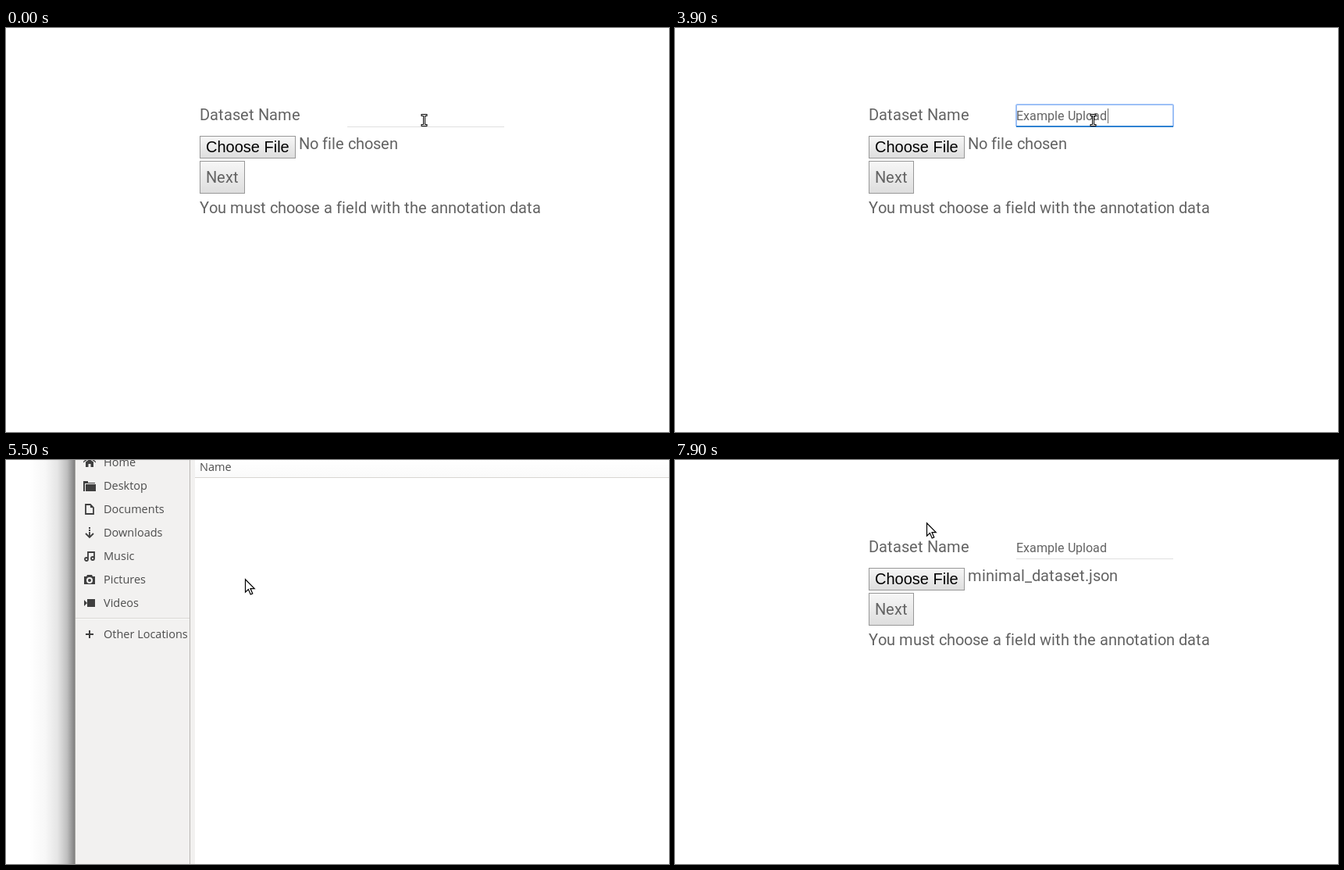
Animation, 849 px wide and 517 px high, one loop 8 s. Source, as an HTML page with a canvas:

```html
<!DOCTYPE html>
<html lang="en">
<head>
<meta charset="utf-8">
<title>Dataset upload</title>
<style>
html, body { margin: 0; width: 100%; height: 100%; overflow: hidden; background: #fff; }
canvas { display: block; }
</style>
</head>
<body>
<canvas id="stage" width="849" height="517"></canvas>
<script>
const ctx = document.getElementById('stage').getContext('2d');
const LOOP = 8000;
const INK = '#636363';
const ROBOTO = 'Roboto, sans-serif';
const UI = '14.5px "Open Sans", sans-serif';

const NAME = 'Example Upload';
const KEYS = [1300, 1600, 1700, 1800, 1900, 2100, 2300, 2400, 3000, 3400, 3500, 3700, 3700, 3900];
const SAVED = ['English Tales', 'erwe', 'sample', 'test', 'test data', 'new set'];

// label, centre y, filled path, stroked path (16 px icon box)
const PLACES = [
  ['Home', 3, 'M0 7 8 0l8 7v1.5L8 2.5 0 8.5zM3 7.5 8 4l5 3.5V14H9.5v-4h-3v4H3z', ''],
  ['Desktop', 33, 'M0 2h6v2h9v1H2v10H0zM3 6h13v9H3z', ''],
  ['Documents', 63, 'M9 2v4h4z', 'M3 2h6l4 4v8H3z'],
  ['Downloads', 93, 'M7 1h2v2H7zM7 4h2v2H7z', 'M3 9l5 5 5-5M8 7v6'],
  ['Music', 123, '', 'M6 12V3h8v8M6 12a2 2 0 1 1-4 0a2 2 0 1 1 4 0M14 11a2 2 0 1 1-4 0a2 2 0 1 1 4 0'],
  ['Pictures', 153, 'M1 4h3l1-2h6l1 2h3v10H1zM12 9a4 4 0 1 0-8 0a4 4 0 1 0 8 0M10 9a2 2 0 1 0-4 0a2 2 0 1 0 4 0', ''],
  ['Videos', 183, 'M1 4l4 4-4 4zM5 3h10v10H5z', ''],
  ['Other Locations', 223, 'M7 3h2v4h4v2H9v4H7V9H3V7h4z', '']
];

const ARROW = new Path2D('M.5 .8V17.2L4.4 13.6 7.2 20 9.8 18.9 7 12.6H12.2z');
const IBEAM = new Path2D('M-2.5 -6.5H2.5M0 -6.5V6.5M-2.5 6.5H2.5');

function rect(x, y, w, h, fill) {
  ctx.fillStyle = fill;
  ctx.fillRect(x, y, w, h);
}

function frame(x, y, w, h, color) {
  ctx.strokeStyle = color;
  ctx.lineWidth = 1;
  ctx.strokeRect(x + .5, y + .5, w - 1, h - 1);
}

function gradient(x0, y0, x1, y1, stops) {
  const g = ctx.createLinearGradient(x0, y0, x1, y1);
  stops.forEach(([at, color]) => g.addColorStop(at, color));
  return g;
}

function text(str, x, y, font, color) {
  ctx.font = font;
  ctx.fillStyle = color;
  ctx.fillText(str, x, y);
}

// Roboto with whole-pixel advances; returns the end x
function snapped(str, x, y, size, widths = {}) {
  for (const c of str) {
    text(c, x, y, size + 'px ' + ROBOTO, INK);
    x += widths[c] || Math.round(ctx.measureText(c).width);
  }
  return x;
}

function button(x, y, w, h, pressed) {
  const colors = pressed ? ['#dddddd', '#f6f6f6'] : ['#f7f7f7', '#dddddd'];
  rect(x, y, w, h, gradient(0, y, 0, y + h, [[0, colors[0]], [1, colors[1]]]));
  frame(x, y, w, h, '#989898');
}

function drawField(t) {
  const focused = t >= 200 && t < 5300;
  const typed = NAME.slice(0, KEYS.filter(k => k <= t).length);
  if (focused) {
    ctx.strokeStyle = '#9dc0f6';
    ctx.lineWidth = 2;
    ctx.beginPath();
    ctx.roundRect(437, 98, 201, 28, 1.5);
    ctx.stroke();
    rect(437, 125, 201, 2, '#2f82d2');
  } else {
    rect(437, 126, 201, 1, '#e0e0e0');
  }
  const end = snapped(typed, 437, 118, 16, { e: 9, d: 10 });
  const blinkedOff = t >= 800 && t < 1300;
  if (focused && !blinkedOff) rect(end, 103, 1, 19, '#666');
}

function drawMenu(t) {
  if (t < 300 || t >= 1600) return;
  const items = t < 1300 ? SAVED : SAVED.slice(0, 2);
  const h = items.length * 24 + 2;
  rect(436, 127, 204, h, '#fff');
  frame(436, 127, 204, h, '#000');
  items.forEach((s, i) => text(s, 445, 145 + i * 24, 'bold 14.4px "Open Sans", sans-serif', '#000'));
}

function drawForm(t) {
  snapped('Dataset Name', 248, 118, 20);
  button(248, 138, 123, 29, t >= 5300 && t < 5500);
  text('Choose File', 256, 159, '20px "Liberation Sans", Arial, sans-serif', '#000');
  snapped(t < 7300 ? 'No file chosen' : 'minimal_dataset.json', 375, 155, 20);
  button(248, 170, 58, 42, false);
  snapped('Next', 256, 198, 20);
  snapped('You must choose a field with the annotation data', 248, 237, 20);
  drawField(t);
  drawMenu(t);
}

function drawPlace([label, y, solid, line]) {
  text(label, 125, y + 5, UI, '#4c4c4c');
  ctx.save();
  ctx.translate(99, y - 8);
  ctx.fillStyle = ctx.strokeStyle = '#3f3f3f';
  ctx.lineWidth = 1.8;
  ctx.fill(new Path2D(solid), 'evenodd');
  ctx.stroke(new Path2D(line));
  ctx.restore();
}

function drawFileRow() {
  rect(242, 23, 607, 22, gradient(0, 23, 0, 45, [[0, '#eb6c3b'], [1, '#f27f50']]));
  rect(242, 23, 607, 1, '#e0642f');
  rect(251, 26, 12, 16, '#ecebe8');
  frame(251, 26, 12, 16, '#b5aca5');
  for (let i = 0; i < 5; i++) rect(253, 29 + i * 2, 5 + i * 2 % 3, 1, '#8d8a86');
  text('minimal_dataset.json', 273, 39, UI, '#fff');
}

function drawDialog(t) {
  const shade = [[0, 0], [.35, .03], [.62, .1], [.83, .25], [1, .5]];
  rect(30, 0, 58, 517, gradient(30, 0, 88, 0, shade.map(([at, a]) => [at, `rgba(0,0,0,${a})`])));
  rect(88, 0, 154, 517, '#f2f1f0');
  rect(88, 0, 1, 517, '#a5a3a0');
  rect(235, 0, 1, 517, '#bab7b4');
  rect(89, 202, 146, 1, '#d9d7d4');
  rect(89, 203, 146, 1, '#fbfbfa');
  PLACES.forEach(drawPlace);
  rect(242, 0, 607, 517, '#fff');
  rect(242, 0, 607, 22, gradient(0, 0, 0, 22, [[0, '#fff'], [1, '#fafafa']]));
  rect(242, 22, 607, 1, '#d8d5d2');
  text('Name', 248, 14, UI, '#4c4c4c');
  if (t >= 5600) drawFileRow();
}

// Curved pointer move in 100 ms steps
function glide(t, start, steps, a, b, c) {
  const p = Math.min(1, (Math.floor((t - start) / 100) + 1) / steps);
  const u = p * p * (3 - 2 * p);
  return [0, 1].map(i => Math.round((1 - u) ** 2 * a[i] + 2 * u * (1 - u) * b[i] + u * u * c[i]));
}

function pointer(t) {
  if (t < 4500) return [535, 118];
  if (t < 5900) return glide(t, 4500, 8, [535, 118], [430, 58], [306, 152]);
  if (t < 7900) return glide(t, 5900, 6, [306, 152], [350, 88], [322, 24]);
  return [322, 80];
}

function drawPointer(t) {
  const [x, y] = pointer(t);
  const overField = t < 5300 && x > 436 && x < 639 && y > 97 && y < 127;
  ctx.save();
  if (overField) {
    ctx.translate(x + .5, y);
    ctx.lineCap = 'square';
    ctx.strokeStyle = '#000';
    ctx.lineWidth = 3;
    ctx.stroke(IBEAM);
    ctx.strokeStyle = '#fff';
    ctx.lineWidth = 1;
    ctx.stroke(IBEAM);
  } else {
    ctx.translate(x, y);
    ctx.fillStyle = '#fff';
    ctx.strokeStyle = '#000';
    ctx.lineWidth = 1.2;
    ctx.fill(ARROW);
    ctx.stroke(ARROW);
  }
  ctx.restore();
}

function draw(t) {
  rect(0, 0, 849, 517, '#fff');
  if (t >= 5500 && t < 7300) drawDialog(t);
  else drawForm(t);
  drawPointer(t);
}

const begin = performance.now();
function tick() {
  draw((performance.now() - begin) % LOOP);
  requestAnimationFrame(tick);
}
tick();
</script>
</body>
</html>
```
